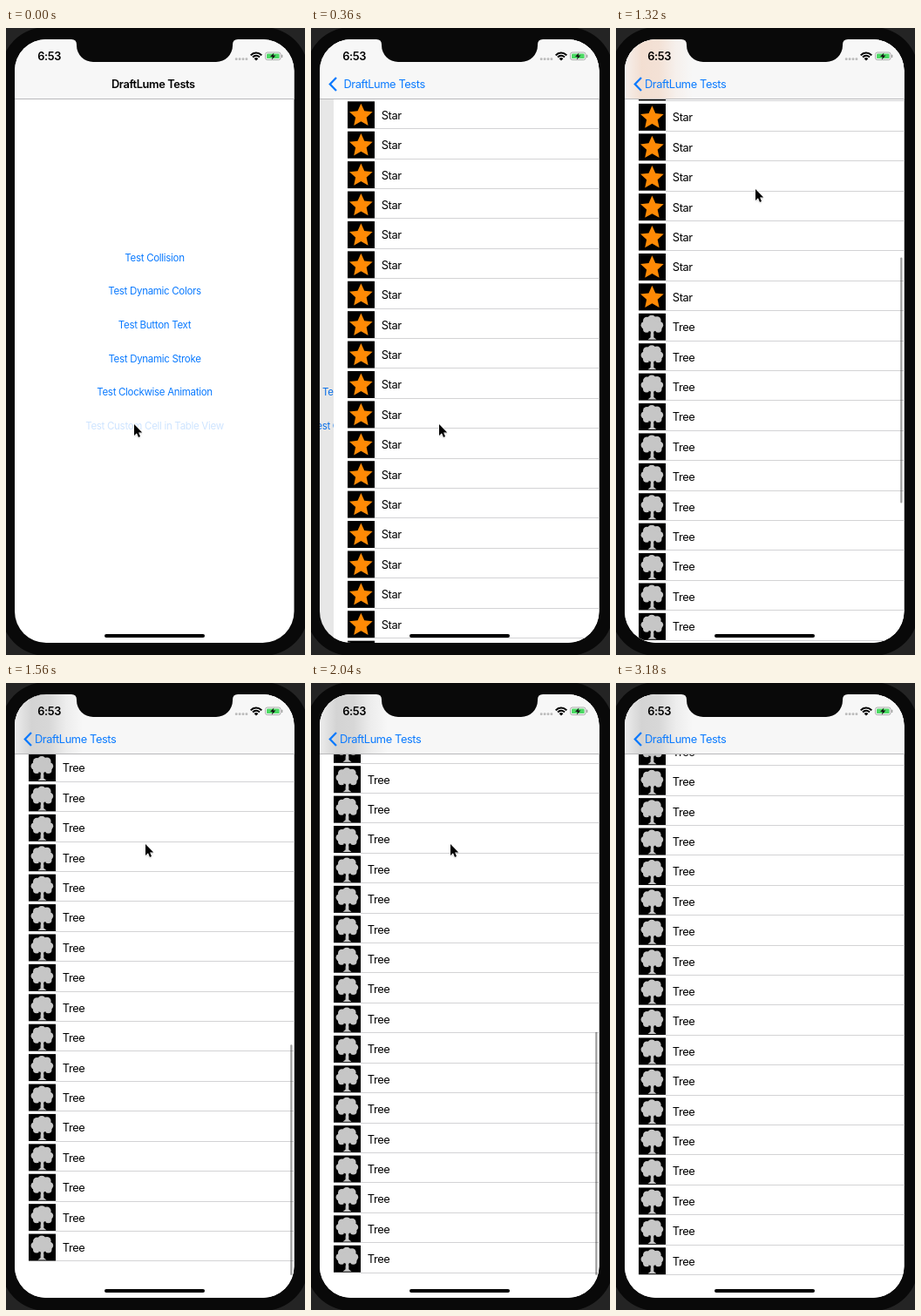
Recreate the animation shown at these times as an HTML page with a canvas. Size 343 by 720 pixels, loop 3300 ms.

```html
<!DOCTYPE html>
<html lang="en">
<head>
<meta charset="utf-8">
<title>Phone list demo</title>
<style>
html, body { margin: 0; width: 100%; height: 100%; overflow: hidden; background: #1c1c1c; }
canvas { display: block; width: 343px; height: 720px; }
</style>
</head>
<body>
<canvas id="stage" width="343" height="720"></canvas>
<script>
const ctx = document.getElementById('stage').getContext('2d');
const LOOP = 3300, STEP = 60;
const SCREEN = { x: 10, y: 13, w: 320.5, h: 693, r: 36 };
const NAV_BOTTOM = 81.5, ROW = 34.41, STARS = 20, ROWS = 40, MAX_SCROLL = 778;
const BLUE = '#0a7aff', TITLE = 'DraftLume Tests';
const BUTTONS = ['Test Collision', 'Test Dynamic Colors', 'Test Button Text',
  'Test Dynamic Stroke', 'Test Clockwise Animation', 'Test Custom Cell in Table View'];

const clamp = v => Math.max(0, Math.min(1, v));
const ramp = (t, a, b) => clamp((t - a) / (b - a));
const mix = (a, b, k) => a + (b - a) * k;

function rect(x, y, w, h, color) {
  ctx.fillStyle = color;
  ctx.fillRect(x, y, w, h);
}

function round(x, y, w, h, r, color) {
  ctx.beginPath();
  ctx.roundRect(x, y, w, h, r);
  ctx.fillStyle = color;
  ctx.fill();
}

function poly(points, color) {
  ctx.beginPath();
  points.forEach(([x, y]) => ctx.lineTo(x, y));
  ctx.closePath();
  ctx.fillStyle = color;
  ctx.fill();
}

function text(str, x, y, size, color, { weight = 400, align = 'left', alpha = 1 } = {}) {
  ctx.save();
  ctx.globalAlpha *= alpha;
  ctx.font = `${weight} ${size}px Inter, Roboto, sans-serif`;
  ctx.letterSpacing = size < 12 ? '-0.3px' : '-0.38px';
  ctx.textAlign = align;
  ctx.textBaseline = 'alphabetic';
  ctx.fillStyle = color;
  ctx.fillText(str, x, y);
  ctx.restore();
}

// Critically damped push transition, 0 to 1
function pushAt(t) {
  if (t < 100) return 0;
  if (t > 640) return 1;
  const k = 0.01826 * (t - 100);
  return 1 - (1 + k) * Math.exp(-k);
}

const dragAt = t => ramp(t, 1020, 1240) ** 2;

// Drag, free deceleration, then the spring at the end of the list
function scrollAt(t) {
  if (t < 1240) return Math.max(0, 281 * dragAt(t) - 10);
  if (t < 1522) return 271 + 1175 * (1 - Math.exp(-0.002 * (t - 1240)));
  const d = t - 1522;
  return MAX_SCROLL + 0.5885 * d * Math.exp(-0.00927 * d);
}

function cursorAt(t) {
  if (t >= 2880) return null;
  if (t >= 2640) {
    const k = ramp(t, 2640, 2820) ** 2;
    return [mix(160, 322, k), mix(185, 530, k)];
  }
  const settle = ramp(t, 540, 780), drag = dragAt(t);
  return [mix(147 + settle, 160, drag), mix(455 + 11 * settle, 185, drag)];
}

function star(x, y) {
  const pts = [];
  for (let i = 0; i < 10; i++) {
    const a = -Math.PI / 2 + i * Math.PI / 5, r = i % 2 ? 6.6 : 14;
    pts.push([x + r * Math.cos(a), y + r * Math.sin(a)]);
  }
  poly(pts, '#ff8a05');
}

function tree(x, y) {
  const gray = '#c6c6c6';
  const leaves = [[15, 7, 5], [9.5, 8.5, 4.5], [21, 8, 4.6], [6.8, 13.5, 4.2], [24, 13.5, 4.2],
    [9, 18, 4], [22.5, 18, 4], [15.5, 14, 7]];
  ctx.fillStyle = gray;
  for (const [dx, dy, r] of leaves) {
    ctx.beginPath();
    ctx.arc(x + dx, y + dy, r, 0, Math.PI * 2);
    ctx.fill();
  }
  poly([[13.6, 19], [17.6, 19], [17.3, 27.5], [20.5, 30], [10.5, 30], [13.6, 27.5]]
    .map(([dx, dy]) => [x + dx, y + dy]), gray);
  poly([[11, 20], [13.7, 21.4], [13.7, 24]].map(([dx, dy]) => [x + dx, y + dy]), '#000');
  poly([[20, 20], [17.4, 21.4], [17.4, 24]].map(([dx, dy]) => [x + dx, y + dy]), '#000');
}

function home(t, push) {
  ctx.save();
  ctx.translate(-96 * push, 0);
  BUTTONS.forEach((label, i) => {
    const alpha = i === 5 ? mix(0.2, 1, ramp(t, 60, 300)) : 1;
    text(label, 170.5, 267.5 + i * 38.7, 11.5, BLUE, { align: 'center', alpha });
  });
  ctx.restore();
  rect(10, 13, 321, 693, `rgba(0,0,0,${0.1 * push})`);
}

function list(scroll, push) {
  ctx.save();
  ctx.translate(320.5 * (1 - push), 0);
  rect(10, 13, 321, 693, '#fff');
  for (let i = 0; i < ROWS; i++) {
    const y = 81.7 + i * ROW - scroll;
    if (y < 0 || y > 710) continue;
    rect(26, y + 2.6, 31, 31, '#000');
    if (i < STARS) star(41.4, y + 19);
    else tree(26, y + 2.6);
    text(i < STARS ? 'Star' : 'Tree', 64.8, y + 23, 12.8, '#000');
    rect(57, Math.round(y + 33.4), 275, 1, '#d3d3d5');
  }
  ctx.restore();
}

function scrollBar(t, scroll) {
  const alpha = ramp(t, 560, 680) * (1 - ramp(t, 2400, 2640));
  if (!alpha) return;
  const over = Math.max(0, scroll - MAX_SCROLL);
  const top = 84 + 314 * Math.min(1, scroll / MAX_SCROLL) + over * 1.1;
  const bottom = Math.min(680, top + 282);
  round(326.2, top, 2.2, bottom - top, 1.1, `rgba(0,0,0,${0.38 * alpha})`);
}

function navBar(scroll, push) {
  rect(10, 13, 321, NAV_BOTTOM - 13, '#f7f7f7');
  if (scroll > 0) {
    const k = ramp(scroll, STARS * ROW - 30, STARS * ROW + 50);
    const rgb = [mix(225, 70, k), mix(125, 70, k), mix(60, 70, k)].map(Math.round);
    const strength = 0.2 * clamp(scroll / 60);
    const tint = ctx.createLinearGradient(10, 0, 88, 0);
    [0.3, 1, 0.9, 0.3, 0].forEach((a, i) =>
      tint.addColorStop(i / 4, `rgba(${rgb},${strength * a})`));
    rect(10, 13, 80, NAV_BOTTOM - 13, tint);
  }
  rect(10, 81, 321, 1, '#b9b9bb');

  const x = mix(121, 33, push);
  text(TITLE, x, 69, 12.8, '#000', { weight: 600, alpha: clamp(1 - push * 1.6) });
  text(TITLE, x, 69, 12.8, BLUE, { alpha: clamp(push * 1.6 - 0.5) });
  ctx.save();
  ctx.globalAlpha = clamp(push * 1.5 - 0.3);
  ctx.beginPath();
  ctx.moveTo(29, 57);
  ctx.lineTo(21.8, 64.5);
  ctx.lineTo(29, 72);
  ctx.strokeStyle = BLUE;
  ctx.lineWidth = 2.3;
  ctx.stroke();
  ctx.restore();
}

function statusBar() {
  text('6:53', 36.3, 37, 12.8, '#000', { weight: 600 });
  for (let i = 0; i < 4; i++) round(262.8 + i * 3.9, 34.2, 2.8, 2.8, 1, '#bcbcbc');

  ctx.strokeStyle = '#000';
  ctx.lineWidth = 2;
  for (const r of [8.6, 5.4]) {
    ctx.beginPath();
    ctx.arc(287, 37.2, r, -Math.PI * 0.76, -Math.PI * 0.24);
    ctx.stroke();
  }
  ctx.beginPath();
  ctx.moveTo(287, 37.4);
  ctx.arc(287, 37.4, 3.2, -Math.PI * 0.76, -Math.PI * 0.24);
  ctx.fillStyle = '#000';
  ctx.fill();

  ctx.beginPath();
  ctx.roundRect(297.5, 28, 17.6, 8.6, 2.4);
  ctx.strokeStyle = '#a3a3a3';
  ctx.lineWidth = 0.9;
  ctx.stroke();
  round(299, 29.5, 14.6, 5.6, 1.2, '#4cd964');
  round(316, 30.6, 1.3, 3.4, 0.6, '#a3a3a3');
  poly([[307.4, 28.4], [303, 33], [305.8, 33], [304.8, 36.4], [309.4, 31.6], [306.6, 31.6]], '#111');
}

function notch() {
  ctx.beginPath();
  ctx.moveTo(75, 12);
  ctx.lineTo(75, 13);
  ctx.quadraticCurveTo(81, 13, 81, 19);
  ctx.arcTo(81, 39, 101, 39, 19);
  ctx.lineTo(240, 39);
  ctx.arcTo(260, 39, 260, 19, 19);
  ctx.lineTo(260, 19);
  ctx.quadraticCurveTo(260, 13, 266, 13);
  ctx.lineTo(266, 12);
  ctx.closePath();
  ctx.fillStyle = '#090909';
  ctx.fill();
}

function pointer(pos) {
  if (!pos) return;
  ctx.save();
  ctx.translate(...pos);
  ctx.shadowColor = 'rgba(0,0,0,0.35)';
  ctx.shadowBlur = 2;
  ctx.shadowOffsetY = 1;
  const arrow = [[0, 0], [0, 13], [3, 10.3], [5, 15], [7, 14.1], [5.1, 9.6], [9.2, 9.4]];
  poly(arrow, '#000');
  ctx.shadowColor = 'transparent';
  ctx.strokeStyle = '#fff';
  ctx.lineWidth = 1.4;
  ctx.lineJoin = 'round';
  ctx.stroke();
  poly(arrow, '#000');
  ctx.restore();
}

function draw(t) {
  const push = pushAt(t), scroll = scrollAt(t);
  rect(0, 0, 343, 720, '#242424');
  round(-6, -1, 353, 722, 52, '#090909');

  ctx.save();
  ctx.beginPath();
  ctx.roundRect(SCREEN.x, SCREEN.y, SCREEN.w, SCREEN.h, SCREEN.r);
  ctx.clip();
  rect(10, 13, 321, 693, '#fff');
  if (push < 1) home(t, push);
  if (push > 0) list(scroll, push);
  scrollBar(t, scroll);
  navBar(scroll, push);
  statusBar();
  round(113, 696, 115, 4, 2, '#000');
  ctx.restore();

  notch();
  pointer(cursorAt(t));
}

function frame(now) {
  const t = now % LOOP;
  draw(Math.floor(t / STEP) * STEP);
  requestAnimationFrame(frame);
}
requestAnimationFrame(frame);
</script>
</body>
</html>
```
